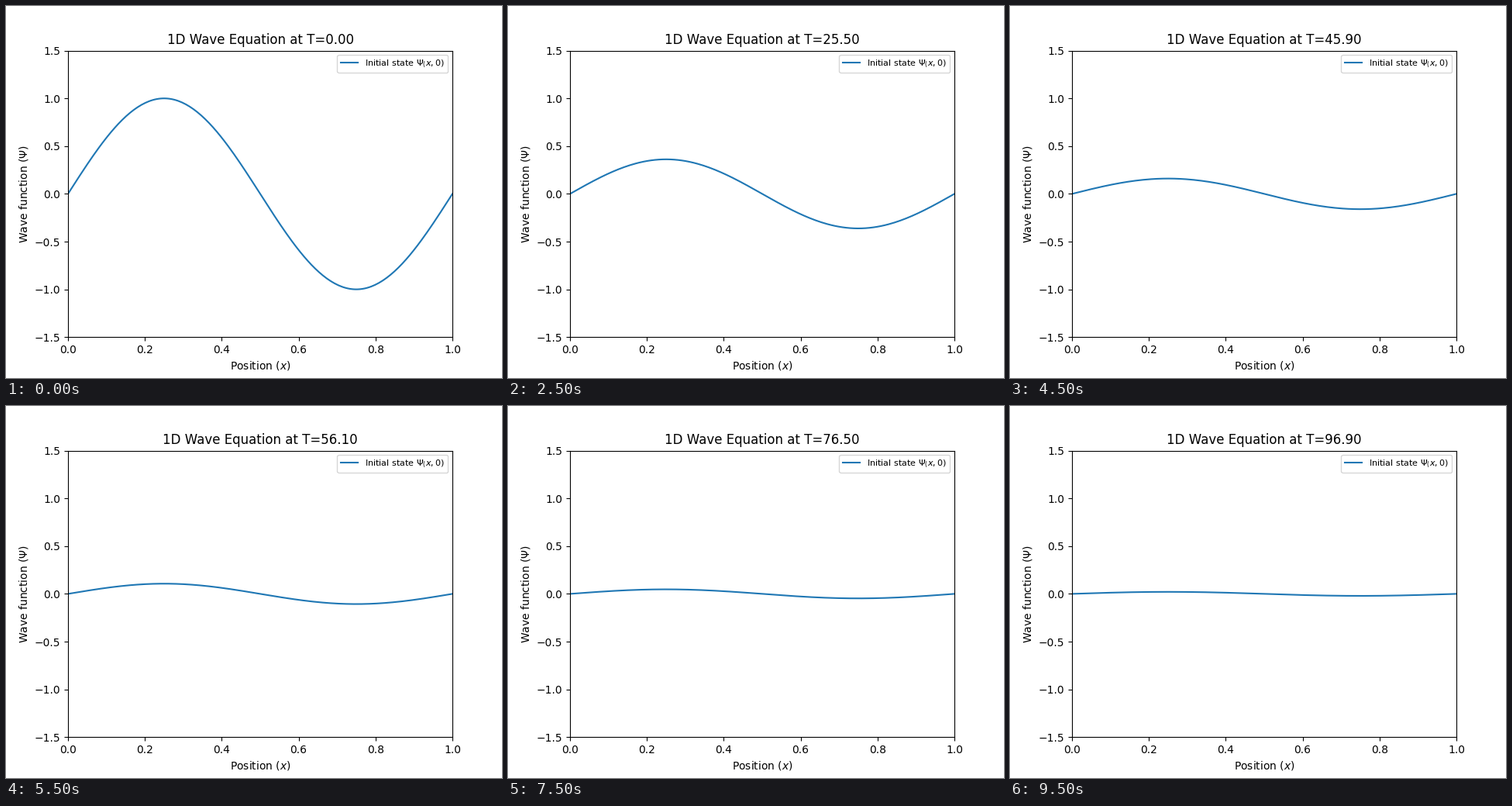
A matplotlib script for the animation above (10000 ms loop, 640 by 480 pixels).

```python
import numpy as np
import matplotlib.pyplot as plt
from matplotlib.animation import FuncAnimation

FRAMES = 20
INTERVAL = 500      # ms
TIME_STEP = 5.1     # simulated time per frame
POINTS = 200
DIFFUSIVITY = 0.001

# The grid step is 1/POINTS while x has POINTS - 1 gaps, so decay is slightly faster.
decay_rate = DIFFUSIVITY * (2 * np.pi * POINTS / (POINTS - 1)) ** 2

x = np.linspace(0, 1, POINTS)
initial = np.sin(2 * np.pi * x)

fig, ax = plt.subplots(figsize=(6.4, 4.8), dpi=100)
line, = ax.plot(x, initial, label=r"Initial state $\Psi_(x,0)$")
ax.set_xlim(0, 1)
ax.set_ylim(-1.5, 1.5)
ax.set_xlabel("Position ($x$)")
ax.set_ylabel(r"Wave function ($\Psi$)")
title = ax.set_title("")
ax.legend(loc="upper right", fontsize=8)


def update(frame):
    t = frame * TIME_STEP
    line.set_ydata(initial * np.exp(-decay_rate * t))
    title.set_text(f"1D Wave Equation at T={t:.2f}")
    return line, title


anim = FuncAnimation(fig, update, frames=FRAMES, interval=INTERVAL,
                     repeat=True, repeat_delay=0, blit=False)
plt.show()
```
